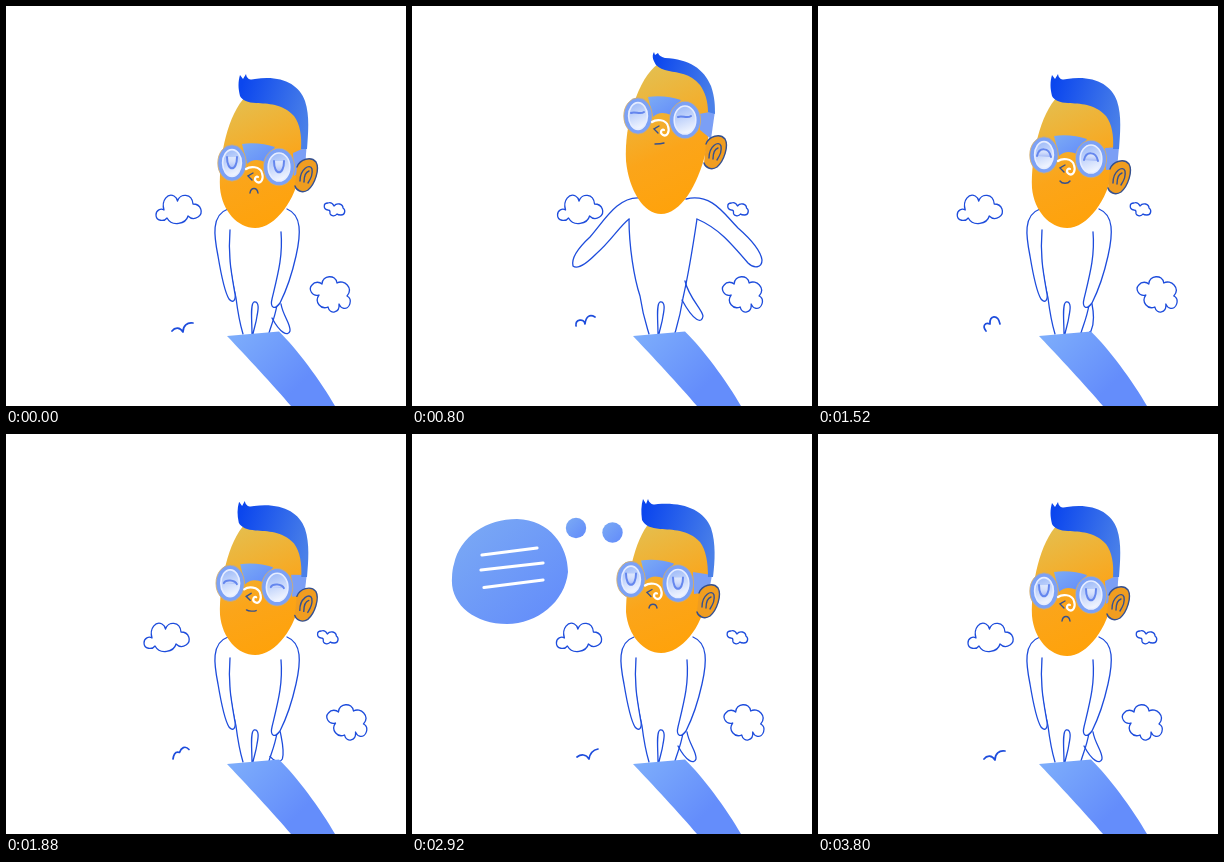
Animation, 400 px wide and 400 px high, one loop 3.84 s. Source, as an HTML page:

```html
<!DOCTYPE html>
<html lang="en">
<head>
<meta charset="utf-8">
<style>
html, body { margin: 0; width: 100%; height: 100%; overflow: hidden; background: #fff; }
svg { display: block; width: 100vw; height: 100vh; }
.line { fill: none; stroke: #1d4cdc; stroke-width: 1.3; stroke-linecap: round; stroke-linejoin: round; }
.arm { fill: #fff; }
.ink { fill: none; stroke: #35508f; stroke-width: 1.4; stroke-linecap: round; }
.white { fill: none; stroke: #fff; stroke-linecap: round; }
</style>
</head>
<body>
<svg viewBox="0 0 400 400">
  <defs>
    <linearGradient id="skin" x1=".3" y1="0" x2=".55" y2="1"><stop stop-color="#e3c052"/><stop offset=".6" stop-color="#fba51a"/><stop offset="1" stop-color="#ffa20a"/></linearGradient>
    <linearGradient id="hairFill" x1="0" y1=".3" x2="1" y2=".6"><stop stop-color="#0b46ee"/><stop offset="1" stop-color="#4a80e8"/></linearGradient>
    <linearGradient id="sky" x1="0" y1="0" x2="1" y2="1"><stop stop-color="#7cabf4"/><stop offset="1" stop-color="#618afb"/></linearGradient>
    <linearGradient id="deck" x1="0" y1=".1" x2=".75" y2=".6"><stop stop-color="#7dadfb"/><stop offset="1" stop-color="#648dfb"/></linearGradient>
    <linearGradient id="glass" x1=".3" y1="0" x2=".6" y2="1"><stop stop-color="#9dbaf8"/><stop offset="1" stop-color="#f4f7ff"/></linearGradient>
    <linearGradient id="lid" x1="0" y1="0" x2="0" y2="1"><stop stop-color="#fff" stop-opacity=".5"/><stop offset="1" stop-color="#9db4f6"/></linearGradient>
  </defs>
  <g class="line">
    <path id="cloudA" d="M158 204C155 194 162 187 168 190C170 191 171 193 171.500 195C174 187 186 187 187 198C195 198 198 207 192 211C189 213 185 213 182 210C180 218 166 221 161 212C158 216 150 215 150 209C150 204 155 202 158 204Z"/>
    <path id="cloudB" d="M316 278C316 269 330 268 331 277C338 273 348 282 341 290C347 293 344 304 337 302C335 302 334 300 333 298C334 307 324 309 322 301C315 304 308 296 313 289C306 291 302 283 306 279C309 275 314 276 316 278Z"/>
    <path id="cloudC" d="M322 204C317 203 317 197 322 197C325 196 327 198 328 200C331 196 337 198 337 202C340 204 339 209 335 209C333 209 332 209 331 208C329 211 323 210 324 206C324 205 323 204 322 204Z"/>
    <path id="bird" stroke-width="1.7"/>
    <path id="tail"/>
    <path id="torso"/>
    <path d="M246 328C246 315 244 298 248 296C254 295 252 305 251 310C250 318 248 322 247 328"/>
    <path id="armL" class="arm"/>
    <path id="armR" class="arm"/>
  </g>
  <path d="M221 330L273 325.5C290 342 315 375 329 400H285C268 380 240 350 221 330Z" fill="url(#deck)"/>
  <path id="head" fill="url(#skin)"/>
  <path id="strap" fill="#7b9ff5"/>
  <path id="hair" fill="url(#hairFill)"/>
  <g id="ear">
    <path class="ink" style="fill:#f09d20" d="M291 161C294 153 305 150 310 156C314 163 309 178 302 184C296 188 290 184 289 180"/>
    <path class="ink" d="M294 175C294 163 304 157 306 163C307 168 304 174 302 177M298 176C298 170 300 166 303 165"/>
  </g>
  <g id="goggles">
    <path d="M236 138C247 136 260 138 269 141L259 156C252 153 246 153 241 158Z" fill="url(#sky)"/>
    <g id="lenses"></g>
    <path class="ink" d="M247 167L242 170L246 174"/>
    <path class="white" stroke-width="2.2" d="M240 163C244 160 254 160 256 167C258 173 255 178 251 176C247 174 250 169 252 171"/>
  </g>
  <path id="mouth" class="ink"/>
  <g id="dotA"><circle r="10.2" fill="url(#sky)"/></g>
  <g id="dotB"><circle r="10.2" fill="url(#sky)"/></g>
  <g id="bubble">
    <path transform="translate(-98 -138)" fill="url(#sky)" d="M42 130C48 102 75 85 105 85C138 86 156 112 156 138C153 168 125 190 95 190C62 190 38 170 40 144C40 138 41 133 42 130Z"/>
    <g id="notes" class="white" stroke-width="3.2" transform="translate(-98 -138)">
      <path pathLength="1" d="M70 121L125 114"/><path pathLength="1" d="M69 136L131 129"/><path pathLength="1" d="M72 153.500L131 146"/>
    </g>
  </g>
</svg>
<script>
const LOOP = 3840;
const $ = id => document.getElementById(id);
const clamp = u => Math.max(0, Math.min(1, u));
const smooth = u => u * u * (3 - 2 * u);
const backOut = u => 1 + 2.7 * (u - 1) ** 3 + 1.7 * (u - 1) ** 2;

$('lenses').innerHTML = [[226, 157, 14.2, 18.2], [273, 161, 15.6, 18.8]].map(([x, y, rx, ry]) => `
  <g transform="translate(${x} ${y})">
    <ellipse rx="${rx}" ry="${ry}" fill="#7ca1f5" stroke="#d9ae62" stroke-width=".8"/>
    <ellipse rx="${rx - 4.8}" ry="${ry - 4.8}" fill="url(#glass)" stroke="#e6edff" stroke-width="1.6"/>
    <path class="eye" fill="url(#lid)" stroke="#6486ee" stroke-width="2" stroke-linecap="round"/>
  </g>`).join('');
const eyes = document.querySelectorAll('.eye');

// A pose without its own shape uses that of its parent pose.
const REST = 0, CROUCH = 1, LEAP = 2, HAPPY = 3, THINK = 4, MUSE = 5;
const parent = { [MUSE]: THINK };
const pick = (list, pose) => list[pose] ?? pick(list, parent[pose] ?? REST);

const shapes = {
  armL: ['M222 203C205 209 208 230 212 250C215 268 218 285 223 293C227 298 230 294 229 288C225 265 222 250 224 224',
    'M219 212C201 217 200 240 204 262C207 278 210 290 214 296C219 299 220 293 218 285C214 265 213 250 217 232',
    'M228 192C206 190 192 215 178 231C165 243 159 252 161 260C166 264 176 256 184 248C200 234 206 222 217 213'],
  armR: ['M281 203C296 209 295 228 290 250C286 268 280 285 274 297C268 305 264 301 266 293C272 268 277 250 275 226',
    'M286 212C301 218 300 238 299 262C298 280 294 292 288 299C282 303 280 297 281 289C285 268 285 250 280 233',
    'M274 193C300 187 312 208 326 222C342 236 349 247 350 254C350 262 342 263 336 257C318 236 306 222 285 213'],
  torso: ['M223 225C221 250 226 275 230 292C232 308 234 318 237 328M276 226C278 250 274 275 271 299C269 311 265 320 263 327',
    'M221 233C220 262 225 283 229 294C232 310 234 318 237 328M279 234C277 262 273 285 270 300C267 313 265 320 263 327',
    'M217 213C217 240 222 272 228 290C231 310 234 318 237 328M285 213C281 240 276 270 271 292C268 311 265 320 263 327'],
  tail: ['M275 298C277 310 285 318 284 325C282 331 274 327 266 312',
    'M276 283C281 300 284 316 282 325C279 330 274 322 269 306',
    'M273 275C277 292 290 303 291 310C290 318 282 316 270 294',
    'M274 298C276 308 276 318 273 325C270 329 266 328 263 327'],
  head: ['M240 90C222 108 213 150 214 182C216 205 232 222 249 222C270 222 290 193 294 165C299 140 300 112 290 95C275 80 252 82 240 90Z',
    'M240 118C224 134 215 170 214 195C216 222 232 237 249 237C270 237 290 212 294 185C300 162 300 140 290 124C275 110 252 110 240 118Z',
    'M246 58C226 72 212 118 214 155C217 185 232 208 249 208C268 208 286 180 294 145C300 115 300 88 288 70C276 58 258 54 246 58Z',
    ,
    'M238 88C222 106 214 148 214 178C216 202 232 219 249 219C270 219 290 193 294 165C299 140 300 112 290 93C275 78 252 80 238 88Z'],
  hair: ['M234 90C232 82 232 76 234 69L237 73L240 68C241 74 245 74 249 73C275 69 293 78 299 95C304 110 302 128 301 143L295 143C296 130 294 118 288 110C276 97 262 98 250 97C242 97 236 94 234 90Z',
    'M232 119C230 111 231 105 234 98L237 102L239 98C241 103 244 103 247 102C273 99 291 106 298 122C303 136 300 152 298 167L295 167C296 156 294 148 288 140C276 130 262 132 248 131C240 130 234 126 232 119Z',
    'M244 59C242 55 239 51 242 46L243 49L246 47C247 50 250 51 253 52C277 53 292 63 299 80C303 92 303 100 303 108L296 106C296 95 293 86 288 79C278 67 266 67 257 65C251 64 247 62 244 59Z',
    ,
    'M230 86C229 78 229 72 231 65L234 70L236 65C238 71 242 71 246 70C272 68 292 76 299 94C304 109 303 127 301 143L296 143C296 128 294 116 288 108C276 95 260 96 248 95C239 94 233 92 230 86Z'],
  strap: ['M287 147L300.5 141L299 163L288 170Z', 'M287 167L297 165L299 181L288 187Z', 'M287 108L303 105L299 133L288 124Z',
    'M287 142L301 141L299 163L288 164Z', 'M281 138L300 141L297 158L282 160Z'],
  mouth: ['M244 187C245 181 251 181 252 187', 'M244 201C245 196 251 196 252 201', 'M243 138C246 138 249 138 252 137',
    'M242 175C244 178 250 178 252 175', 'M237 178C239 176 244 176 246 180', 'M237 174C238 169 244 169 245 174'],
};
const moves = {
  goggles: ['translate(0 0)', 'translate(0 17)', 'translate(0 -47)', 'translate(0 -8)', 'translate(-6 -7)', 'translate(-7 -11.500)'],
  ear: ['translate(0 0)', 'translate(2 17)', 'translate(3 -23)', 'translate(1 2)', 'translate(-3 0)', 'translate(-4 -2)'],
};
const eyeShapes = ['M-5 -6C-5 9 5 9 5 -6', 'M-5 -2C-5 9 5 9 6 -2', 'M-7 -3C-3 -5 2 -1 6 -4', 'M-7 1C-5 -8 5 -8 7 2',
  'M-5 -3C-4 5 4 6 6 -2', 'M-5 -6C-5 9 5 9 5 -6'];

const poseTrack = [[0, REST], [360, CROUCH], [520, CROUCH], [800, LEAP, backOut], [980, LEAP],
  [1170, HAPPY], [1720, HAPPY], [2160, THINK], [2260, THINK], [2700, MUSE], [3400, MUSE], [3760, REST], [LOOP, REST]];

const birdShapes = [
  'M166 325C169 321 174 321 177 326C177 320 181 316 187 317',
  'M175 333C175 329 176 327 179 325C182 324 184 323 188 324',
  'M164 320C163 313 172 312 173 318C174 310 178 308 183 311',
  'M168 325C164 320 167 316 172 318C171 309 180 308 182 318',
  'M166 325C171 324 170 318 175 319C179 319 178 314 184 313',
  'M165 323C169 320 174 320 177 325C178 319 181 316 186 315'];
const birdTrack = [[0, 0], [360, 1], [800, 2], [1520, 3], [2240, 4], [2920, 5], [3800, 0], [LOOP, 0]];

function locate(track, t) {
  const i = track.findIndex(key => key[0] > t);
  const [start, from] = track[i - 1], [end, to, ease = smooth] = track[i];
  return { from, to, u: ease((t - start) / (end - start)) };
}

// Interpolates every number of two strings with the same structure.
function blend(list, { from, to, u }) {
  const target = pick(list, to).match(/-?[\d.]+/g);
  let i = 0;
  return pick(list, from).replace(/-?[\d.]+/g, n => (+n + (target[i++] - n) * u).toFixed(2));
}

function pop(id, x, y, t, start, length, end) {
  const grow = backOut(clamp((t - start) / length));
  const shrink = 1 - smooth(clamp((t - end) / 180));
  const scale = Math.max(0, grow * shrink);
  $(id).setAttribute('transform', `translate(${x} ${y}) scale(${scale})`);
}

function draw(t) {
  const pose = locate(poseTrack, t);
  for (const id in shapes) $(id).setAttribute('d', blend(shapes[id], pose));
  for (const id in moves) $(id).setAttribute('transform', blend(moves[id], pose));
  const eye = blend(eyeShapes, pose);
  eyes.forEach(path => path.setAttribute('d', eye));
  $('bird').setAttribute('d', blend(birdShapes, locate(birdTrack, t)));

  const drift = (1 - Math.cos(t / LOOP * 2 * Math.PI)) / 2;
  Object.entries({ cloudA: -12, cloudB: 16.5, cloudC: -6.7 }).forEach(([id, range]) =>
    $(id).setAttribute('transform', `translate(${range * drift} 0)`));

  pop('dotA', 200.5, 98.5, t, 2050, 180, 3580);
  pop('dotB', 164, 94, t, 2238, 180, 3520);
  pop('bubble', 98, 138, t, 2360, 300, 3440);
  [...$('notes').children].forEach((line, i) => {
    const shown = smooth(clamp((t - 2480 - i * 70) / 180));
    line.style.strokeDasharray = `${shown} 2`;
    line.style.opacity = shown > 0 ? 1 : 0;
  });
}

const began = performance.now();
(function tick() {
  draw((performance.now() - began) % LOOP);
  requestAnimationFrame(tick);
})();
</script>
</body>
</html>
```
